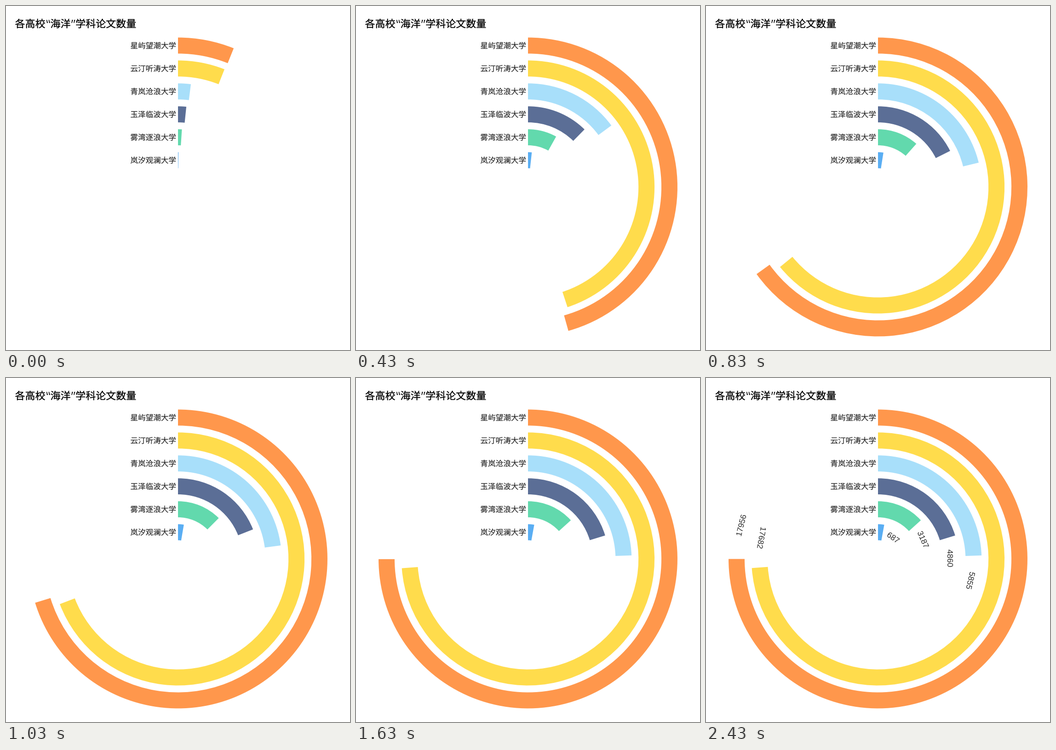
Animation of 748x748 px, one loop 3.01 s. Source, as a matplotlib script:

```python
import matplotlib.pyplot as plt
import numpy as np
from matplotlib.animation import FuncAnimation
from matplotlib.patches import PathPatch, Polygon, Wedge
from matplotlib.textpath import TextPath
from matplotlib.transforms import Affine2D

SIZE = 748
DPI = 100
LOOP = 3010
TICK = 10
STEP = 100 / 3            # the picture updates 30 times a second

CX, CY = 374, 393.5
OUTER = 332.44            # plot radius; the innermost tenth stays empty
BAND = OUTER * 0.9 / 6
SWEEP = 270

GROW_LEAD, GROW_TIME = 50, 1800
FADE_START, FADE_END = 1767, 2000

CJK = "Noto Sans CJK JP"
TITLE_PX, NAME_PX, VALUE_PX = 22, 16.6, 17.3
TITLE_COLOR, NAME_COLOR, VALUE_COLOR = "#000000", "#262626", "#2C2C2C"

BARS = [
    ("星屿望潮大学", 17956, "#FF974C"),
    ("云汀听涛大学", 17682, "#FFDC4C"),
    ("青岚沧浪大学", 5855, "#A8DFFA"),
    ("玉泽临波大学", 4860, "#5B6E96"),
    ("雾湾逐浪大学", 3187, "#62D9AD"),
    ("岚汐观澜大学", 687, "#5AAEF3"),
]
TOP = BARS[0][1]

fig = plt.figure(figsize=(SIZE / DPI, SIZE / DPI), dpi=DPI, facecolor="white")
ax = fig.add_axes([0, 0, 1, 1])
ax.set_xlim(0, SIZE)
ax.set_ylim(SIZE, 0)
ax.axis("off")


def write(x, y, text, px, color, font=CJK, weight=0.0, turn=0, centre=False):
    """Draw text as outlines on the baseline point, turned clockwise."""
    path = TextPath((0, 0), text, size=px, prop={"family": font})
    box = path.get_extents()
    shift = -(box.x0 + box.x1) / 2 if centre else 0
    place = (Affine2D().translate(shift, 0).scale(1, -1)
             .rotate_deg(turn).translate(x, y))
    patch = PathPatch(place.transform_path(path), facecolor=color,
                      edgecolor=color, linewidth=weight)
    return ax.add_patch(patch)


def quote(x, y, closing=False):
    """A pair of slanted wedges, thick at the foot or, closing, at the head."""
    wedge = np.array([(0, 0), (1.3, 0), (3.4, 7), (1.2, 7)])
    if closing:
        wedge[:, 1] = 7 - wedge[:, 1]
    for dx in (0, 4.8):
        ax.add_patch(Polygon(wedge + (x + dx, y), facecolor=TITLE_COLOR,
                             linewidth=0))


def draw_title():
    for x, text in [(19.5, "各高校"), (96.5, "海洋"), (151.2, "学科论文数量")]:
        write(x, 46.4, text, TITLE_PX, TITLE_COLOR, weight=0.25)
    quote(87.8, 30)
    quote(142.3, 30, closing=True)


def draw_value(value, radius):
    """Write a value along its ring, a little past the end of the bar."""
    turn = SWEEP * value / TOP + 11.2 + np.degrees(14.2 / radius)
    flip = 270 < turn < 282
    base = radius - 0.7 + (0.36 if flip else -0.36) * VALUE_PX
    a = np.radians(turn)
    label = write(CX + base * np.sin(a), CY - base * np.cos(a), str(value),
                  VALUE_PX, VALUE_COLOR, "Liberation Sans",
                  turn=turn + (180 if flip else 0), centre=True)
    return label


draw_title()
wedges, values = [], []
for i, (name, value, color) in enumerate(BARS):
    edge = OUTER - BAND * (i + 0.15)
    middle = edge - 0.35 * BAND
    wedge = Wedge((CX, CY), edge, -90, -89, width=0.7 * BAND,
                  facecolor=color, linewidth=0)
    wedges.append(ax.add_patch(wedge))
    write(370 - len(name) * NAME_PX, CY - middle + 6.1, name, NAME_PX,
          NAME_COLOR, weight=0.12)
    values.append(draw_value(value, middle))


def update(frame):
    t = int((frame * TICK + 3.4) / STEP) * STEP
    x = min((t + GROW_LEAD) / GROW_TIME, 1)
    grown = 1 - (1 - x) ** 3
    for wedge, (_, value, _) in zip(wedges, BARS):
        wedge.set_theta2(-90 + SWEEP * value / TOP * grown)
    alpha = float(np.clip((t - FADE_START) / (FADE_END - FADE_START), 0, 1))
    for label in values:
        label.set_alpha(alpha)
    return wedges + values


anim = FuncAnimation(fig, update, frames=LOOP // TICK, interval=TICK,
                     repeat=True, repeat_delay=0)
plt.show()
```
